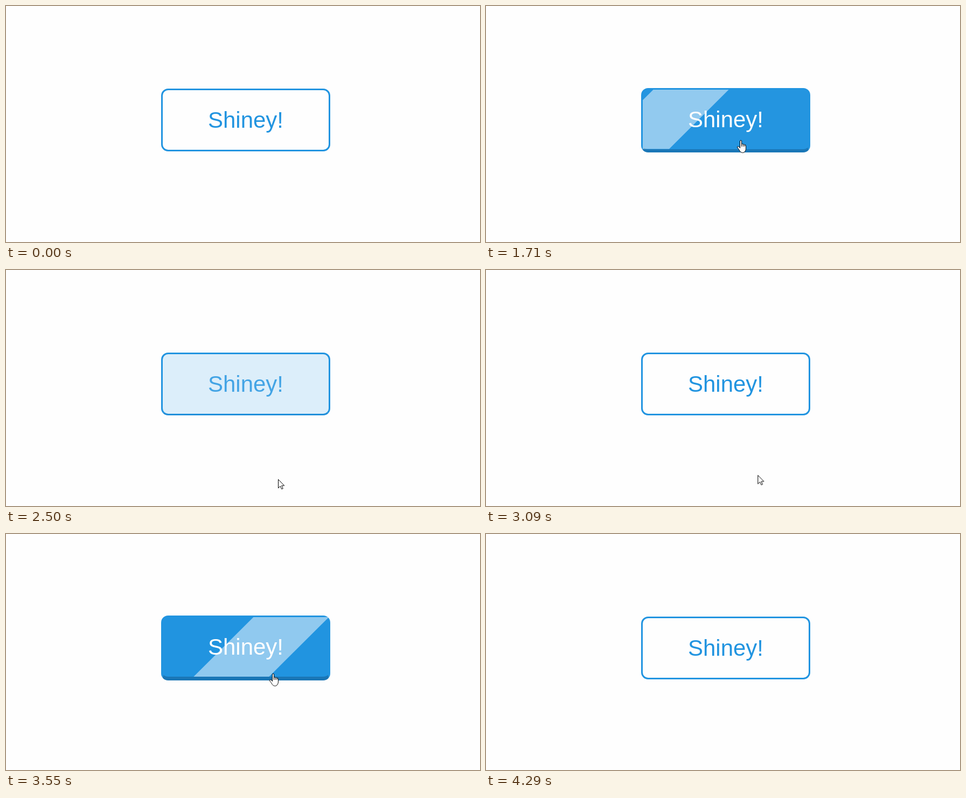
An HTML page that plays this animation: 880x440 px, repeating every 5790 ms.

```html
<!DOCTYPE html>
<html lang="en">
<head>
<meta charset="utf-8">
<title>Shiney button</title>
<style>
  html, body { margin: 0; width: 100%; height: 100%; overflow: hidden; background: #fefefe; }
  #stage { position: relative; width: 880px; height: 440px; overflow: hidden; }
  #center { height: 425px; margin-left: 288px; display: flex; align-items: center; }
  #button {
    position: relative; width: 308px; height: 111px;
    border: 3px solid #2194e0; border-radius: 13px;
    font: 42px/112px "Liberation Sans", Arial, sans-serif; text-align: center; color: #2194e0;
  }
  #shine { position: absolute; inset: 0; background: rgba(255, 255, 255, .5); }
  #cursor { position: absolute; left: 0; top: 0; }
  #cursor svg { position: absolute; top: 0; overflow: visible; fill: #fff; stroke: #000; stroke-linejoin: round; }
  #arrow { left: 0; }
  #hand { left: -6px; }
</style>
</head>
<body>
<div id="stage">
  <div id="center"><div id="button">Shiney!<div id="shine"></div></div></div>
  <div id="cursor">
    <svg id="arrow" width="12" height="19"><path d="M.5 .5V16.6L4.2 13 6.8 18.5 9.2 17.4 6.7 12H11.7Z"/></svg>
    <svg id="hand" width="17" height="24">
      <path d="M5.5 15V2Q5.5 .5 7 .5T8.5 2V7.3Q10.5 6.2 11.3 8Q13.2 7 14 8.8Q16.5 8.2 16.5 11V16Q16.5 19 14.8 21Q13.5 23.5 10.5 23.5Q7 23.5 5.3 20.5Q3.8 17.5 .8 14Q0 12 1.8 11.7Q3.5 11.6 5.5 14.5"/>
      <path fill="none" d="M8.5 7V12M11.3 8V12M14 9V12"/>
    </svg>
  </div>
</div>
<script>
const LOOP = 5790, FADE = 200, SWEEP = 500;
const HOVERS = [[1545, 2391], [3282, 4085]];
const $ = id => document.getElementById(id);
const at = (time, style, easing = "linear") => ({ ...style, offset: time / LOOP, easing });

// The thicker bottom border grows the box, and centring lifts it
const look = (color, fill, edge, width) => ({
  color, backgroundColor: `rgba(33,148,224,${fill})`, borderBottomColor: edge, borderBottomWidth: width
});
const rest = look("#2194e0", 0, "#2194e0", "3px");
const raised = look("#fff", 1, "#1a76b6", "7px");

// Diagonal band whose leading edge lies on x + y = front
const band = front => {
  const h = 111, back = front - 140;
  return { clipPath: `polygon(${front}px 0, ${back}px 0, ${back - h}px ${h}px, ${front - h}px ${h}px)` };
};
const before = band(-79), after = band(641);

const fades = [at(0, rest)], sweeps = [at(0, before)];
for (const [enter, leave] of HOVERS) {
  fades.push(at(enter, rest, "ease"), at(enter + FADE, raised), at(leave, raised, "ease"), at(leave + FADE, rest));
  sweeps.push(at(enter, before), at(enter + SWEEP, after), at(enter + SWEEP, before));
}
fades.push(at(LOOP, rest));
sweeps.push(at(LOOP, before));

// Pointer moves: [start, end, x, y]
const MOVES = [
  [530, 750, 489, 371],
  [1140, 1720, 472, 250],
  [1880, 2110, 474, 261],
  [2330, 2500, 505, 390],
  [3030, 3390, 493, 256],
  [3390, 3580, 495, 260],
  [3960, 4240, 508, 460]
];
const place = (x, y) => ({ transform: `translate(${x}px, ${y}px)` });
let spot = place(481, 445);
const path = [at(0, spot)];
for (const [start, end, x, y] of MOVES) {
  path.push(at(start, spot, "ease-in-out"));
  spot = place(x, y);
  path.push(at(end, spot));
}
path.push(at(LOOP, spot));

const animations = [["button", fades], ["shine", sweeps], ["cursor", path]]
  .map(([id, frames]) => $(id).animate(frames, LOOP));
animations.forEach(a => a.pause());

function draw() {
  const t = performance.now() % LOOP;
  const over = HOVERS.some(([enter, leave]) => t >= enter && t < leave);
  animations.forEach(a => a.currentTime = t);
  $("hand").style.display = over ? "block" : "none";
  $("arrow").style.display = over ? "none" : "block";
  requestAnimationFrame(draw);
}
draw();
</script>
</body>
</html>
```
